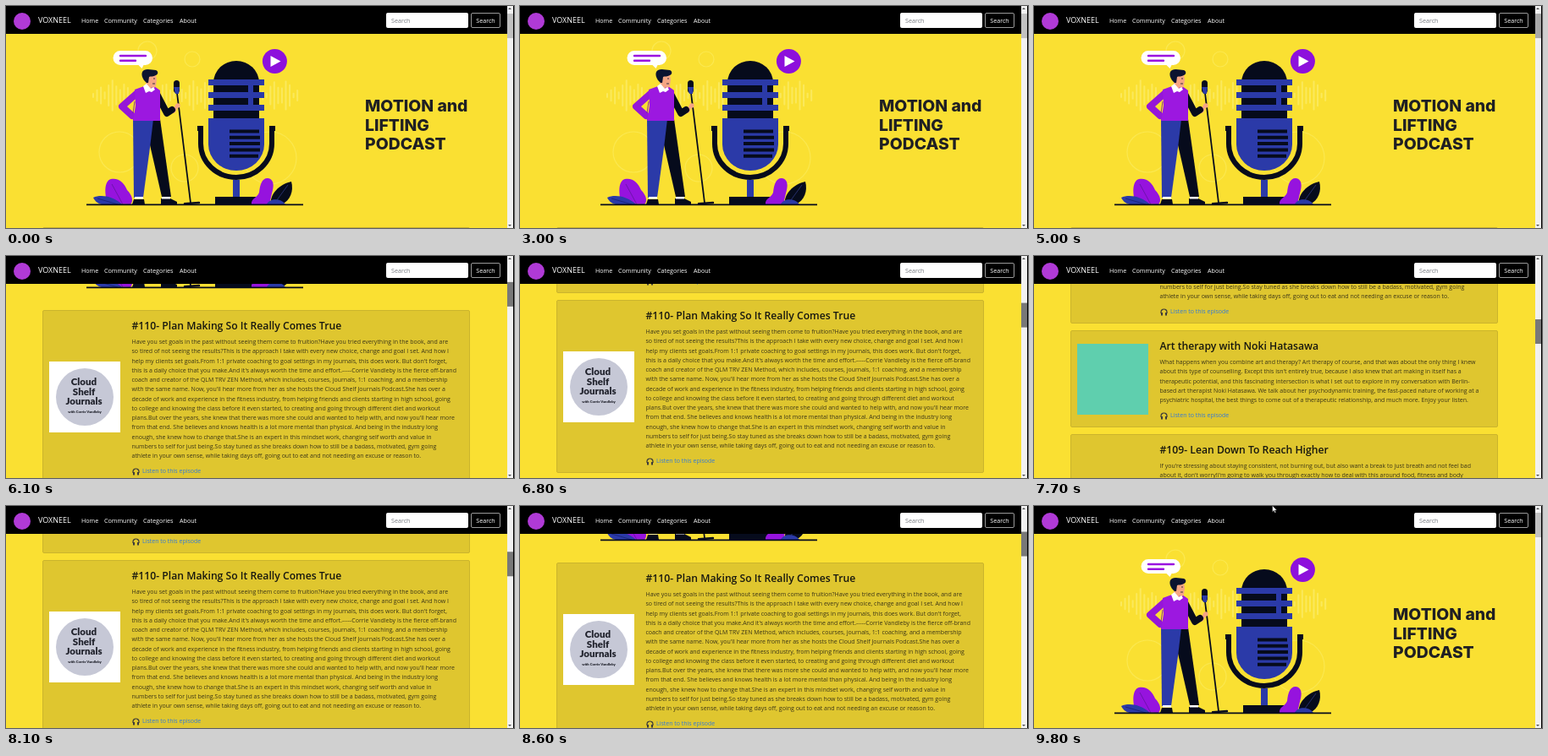
Recreate the animation shown at these times as an HTML page. Size 600 px wide and 263 px high, loop 10 s.

```html
<!DOCTYPE html>
<html lang="en">
<head>
<meta charset="utf-8">
<title>Podcast page</title>
<style>
@property --y { syntax: '<number>'; inherits: true; initial-value: 10; }
html, body { margin: 0; width: 100%; height: 100%; overflow: hidden; }
#stage {
  position: relative; width: 600px; height: 263px; overflow: hidden;
  background: #fae032; color: #212529;
  font: 7px/11.25px "Open Sans", "Noto Sans", sans-serif;
  animation: scroll 10s steps(1) infinite;
}
#stage * { box-sizing: border-box; }
#page { position: absolute; inset: 0; transform: translateY(calc(var(--y) * -1px)); }
#page > svg { position: absolute; left: 0; top: 10px; overflow: visible; }
h1 {
  position: absolute; left: 424px; top: 117px; margin: 0; white-space: pre;
  font: 800 19.4px/22.5px Inter, "Open Sans", sans-serif; color: #1f1f23;
}

.card {
  position: absolute; left: 43px; width: 505px; border-radius: 2px;
  background: #dfc62f; border: 1px solid #cbb42c;
}
.card > * { position: absolute; margin: 0; white-space: pre; }
.card h2 { left: 104.5px; top: 9px; font-size: 12.2px; line-height: 18px; font-weight: 600; color: #17170f; }
.card p { left: 104.5px; top: 31px; color: #3b3517; }
.card a { left: 117px; bottom: 7.5px; color: #3279d8; }
.card .ear { left: 105px; bottom: 8.5px; }
.cover { left: 7px; top: calc(50% - 42px); width: 84px; height: 84px; background: #fff; }
.cover.teal { background: #5fcfae; }
.cover svg { display: block; }

nav { position: absolute; left: 0; top: 0; width: 592px; height: 33px; background: #000; color: #fff; }
nav > * { position: absolute; top: 8px; height: 18px; line-height: 18px; font-size: 7.15px; }
nav i { left: 9px; width: 20px; height: 20px; border-radius: 50%; background: #b03ad6; }
nav b { left: 38px; font-size: 9px; font-weight: 400; }
.field { left: 449px; width: 97px; padding-left: 6px; border-radius: 2px; background: #fff; color: #777b80; }
.btn { left: 549px; width: 35px; border: 1px solid #999; border-radius: 2px; line-height: 16px; text-align: center; }

#bar {
  position: absolute; left: 592px; top: 0; width: 8px; height: 263px;
  background: #f1f1f1; border-right: 1px solid #000;
}
#bar::before, #bar::after {
  content: ""; position: absolute; left: 1px; border: 2.5px solid transparent;
}
#bar::before { top: 0; border-bottom-color: #505050; }
#bar::after { bottom: 0; border-top-color: #505050; }
#thumb {
  position: absolute; left: 0; top: 8px; width: 7px; height: 29px;
  transform: translateY(calc(var(--y) * 1px / 9.1));
  animation: grab 10s steps(1) infinite;
}
#cursor { position: absolute; left: 281px; top: -1px; visibility: hidden; animation: show 10s steps(1) infinite; }

/* The page moves in ticks of 100 ms */
@keyframes scroll {
  0% { --y: 10; }
  54% { --y: 10; animation-timing-function: steps(7); }
  61% { --y: 208; animation-timing-function: steps(2); }
  63% { --y: 262; }
  65% { --y: 262; animation-timing-function: steps(7); }
  72% { --y: 661; animation-timing-function: steps(2); }
  74% { --y: 740; }
  75% { --y: 740; animation-timing-function: steps(4); }
  79% { --y: 480; }
  81% { --y: 421; animation-timing-function: steps(5); }
  86% { --y: 205; }
  88% { --y: 200; }
  90% { --y: 140; }
  92% { --y: 70; animation-timing-function: steps(2); }
  94% { --y: 6; }
  95% { --y: 6; animation-timing-function: steps(3); }
  98%, 100% { --y: 0; }
}
@keyframes grab {
  0%, 94% { background: #c1c1c1; }
  50% { background: #a8a8a8; }
  55% { background: #787878; }
}
@keyframes show {
  0% { visibility: hidden; }
  96%, 100% { visibility: visible; }
}
</style>
</head>
<body>
<div id="stage">
  <div id="page">
    <svg width="600" height="263" fill="none">
      <g stroke="#fbe850" stroke-width="1.2">
        <circle cx="134" cy="173" r="24"/>
        <circle cx="167" cy="53" r="11"/>
        <circle cx="220" cy="63" r="9"/>
        <circle cx="211" cy="192" r="16"/>
        <circle cx="312" cy="180" r="31"/>
      </g>
      <path id="wave" stroke="#fbe95c" stroke-width="2" stroke-linecap="round"/>

      <!-- speech bubble and play button -->
      <path fill="#fff" d="M135 53h29.500a8.500 8.500 0 0 1 0 17h-2l-2 4-4-4H135a8.500 8.500 0 0 1 0-17z"/>
      <path stroke="#9a12e0" stroke-width="2.400" stroke-linecap="round" d="M135 59h30M135 64.700h18"/>
      <circle cx="317.400" cy="65.500" r="14.500" fill="#8d10dc"/>
      <path fill="#fff" d="M312.500 59v13l12-6.500z"/>

      <!-- large microphone -->
      <path fill="#060b1c" d="M245 134V91a27 26 0 0 1 54 0v43z"/>
      <path fill="#2b3aa8" d="M239 133h66v31a33 31 0 0 1-66 0z"/>
      <path stroke="#2b3aa8" stroke-width="7" d="M239 90.500h66M239 105.500h66M239 120.500h66"/>
      <path stroke="#2b3aa8" stroke-width="6" d="M289 90v28"/>
      <path stroke="#060b1c" stroke-width="4"
        d="M264 148.500h35M264 155.800h36M264 163.100h36M264 170.400h36M264 177.700h34"/>
      <path stroke="#060b1c" stroke-width="6" d="M226 145h7M311 145h7M230 142v21a42 40 0 0 0 84 0v-21"/>
      <path fill="#2b3aa8" d="M268 206h8v20h-8z"/>
      <path fill="#060b1c" d="M247 226h52v9h-52z"/>

      <!-- leaves -->
      <path fill="#9613de" d="M120 234c-4-12-4-27 4-29 9-2 16 5 19 13 6 6 8 13 4 17z"/>
      <path fill="#2b3aa8" d="M103 227c9-4 23-2 34 8h-24c-5-1-8-4-10-8z"/>
      <path stroke="#5b1596" stroke-width=".7" d="M125 211l13 24"/>
      <path stroke="#151f6a" stroke-width=".7" d="M108 228l24 7"/>
      <path fill="#9613de" d="M290 235c-1-7 7-8 9-14 1-9 3-17 10-17 9 1 7 12 5 18l-3 13z"/>
      <path fill="#060b1c" d="M313 235c-2-12 10-24 24-27 3 11-1 22-11 27z"/>
      <path fill="#2b3aa8" d="M308 235c3-7 16-8 22 0z"/>
      <path stroke="#35408c" stroke-width=".7" d="M333 212l-16 22"/>

      <!-- speaker -->
      <path fill="#060b1c" d="M163 134h19l13 92h-11z"/>
      <path fill="#2b3aa8" d="M150 134h24l-4 34-8 59h-11z"/>
      <path fill="#060b1c" d="M149 235l2-6h12l1 6zM183 228h11l8 4v3h-19z"/>
      <path fill="#fff" d="M152 226h10v2.500h-10zM184 226h10v2.500h-10z"/>
      <path stroke="#f5a583" stroke-width="4" stroke-linecap="round" d="M151 132l4 1M198 125l4-7"/>
      <path stroke="#060b1c" stroke-width="8" stroke-linejoin="round" stroke-linecap="round" d="M178 104l12 23 6-4"/>
      <path stroke="#9516d8" stroke-width="8" stroke-linejoin="round" stroke-linecap="round" d="M155 103l-18 16 12 11"/>
      <path fill="#9c18e0" d="M152 99l11-4h12l7 5v36h-32l3-18z"/>
      <path stroke="#6d10a5" stroke-width=".8" d="M152 113l-2 14"/>
      <path fill="#f5a583" d="M166 81h11l1 6-1 8c-2 3-4 2-5 1l-1 4-6-3z"/>
      <path fill="#fff" d="M162 95l4-3 5 6 3-2 2 3-4 3-3-1-4 2z"/>
      <path fill="#0b1430" d="M166 91c-5-4-8-12-3-15 4-2 10 0 14 0 3 1 3 5 0 6-3 2-6 1-8 2l-1 7z"/>
      <path stroke="#0b1430" stroke-width=".8" d="M174 86h2M173 92h3"/>

      <!-- stand -->
      <path stroke="#060b1c" stroke-width="1.800" d="M202 103l16 130"/>
      <path stroke="#060b1c" stroke-width="2.400" stroke-linecap="round" d="M211 234.300l17-1.300"/>
      <rect x="198" y="88" width="7" height="15" rx="3.500" fill="#060b1c"/>
      <path fill="#2b3aa8" d="M198.200 96h6.800l-1 8h-4z"/>
      <circle cx="203" cy="118" r="2.700" fill="#f5a583"/>
      <path stroke="#060b1c" stroke-width="1.700" d="M95 235.300h256"/>
    </svg>
    <h1>MOTION and
LIFTING
PODCAST</h1>
  </div>

  <nav>
    <i></i><b>VOXNEEL</b>
    <span style="left:89px">Home</span>
    <span style="left:116px">Community</span>
    <span style="left:162px">Categories</span>
    <span style="left:205px">About</span>
    <span class="field">Search</span>
    <span class="btn">Search</span>
  </nav>
  <div id="bar"><div id="thumb"></div></div>
  <svg id="cursor" width="8" height="11">
    <path fill="#fff" stroke="#222" stroke-width=".6" d="M.500.500v7.500l1.800-1.600 1.200 2.800 1.300-.6-1.200-2.600h2.400z"/>
  </svg>
</div>

<script>
const goals = `Have you set goals in the past without seeing them come to fruition?Have you tried everything in the book, and are
so tired of not seeing the results?This is the approach I take with every new choice, change and goal I set. And how I
help my clients set goals.From 1:1 private coaching to goal settings in my journals, this does work. But don't forget,
this is a daily choice that you make.And it's always worth the time and effort.-----Corrie Vandleby is the fierce off-brand
coach and creator of the QLM TRV ZEN Method, which includes, courses, journals, 1:1 coaching, and a membership
with the same name. Now, you'll hear more from her as she hosts the Cloud Shelf Journals Podcast.She has over a
decade of work and experience in the fitness industry, from helping friends and clients starting in high school, going
to college and knowing the class before it even started, to creating and going through different diet and workout
plans.But over the years, she knew that there was more she could and wanted to help with, and now you'll hear more
from that end. She believes and knows health is a lot more mental than physical. And being in the industry long
enough, she knew how to change that.She is an expert in this mindset work, changing self worth and value in
numbers to self for just being.So stay tuned as she breaks down how to still be a badass, motivated, gym going
athlete in your own sense, while taking days off, going out to eat and not needing an excuse or reason to.`.split('\n');

const art = `What happens when you combine art and therapy? Art therapy of course, and that was about the only thing I knew
about this type of counselling. Except this isn't entirely true, because I also knew that art making in itself has a
therapeutic potential, and this fascinating intersection is what I set out to explore in my conversation with Berlin-
based art therapist Noki Hatasawa. We talk about her psychodynamic training, the fast-paced nature of working at a
psychiatric hospital, the best things to come out of a therapeutic relationship, and much more. Enjoy your listen.`.split('\n');

const rest = `If you're stressing about staying consistent, not burning out, but also want a break to just breath and not feel bad
about it, don't worry!I'm going to walk you through exactly how to deal with this around food, fitness and body
image, without the identity crisis.And if you want more structure on exactly how to go about it, stay tuned till the end
for some ways I can support your through it. Both free and paid!-----Corrie Vandleby is the fierce off-brand coach and
creator of the QLM TRV ZEN Method, which includes, courses, journals, 1:1 coaching, and a membership with the
same name. Now, you'll hear more from her as she hosts the Cloud Shelf Journals Podcast.She has over a decade of`
  .split('\n').concat(goals[6].replace('decade of ', ''), goals.slice(7));

const journal = `<div class="cover"><svg width="84" height="84" text-anchor="middle"
  font-family="Lato, sans-serif" font-weight="900" font-size="11.5" fill="#20222c">
  <circle cx="42" cy="42" r="34" fill="#c6c8d6"/>
  <text x="41" y="28">Cloud</text><text x="41" y="39.500">Shelf</text><text x="41" y="51">Journals</text>
  <text x="42" y="61" font-size="4.2">with Corrie Vandleby</text></svg></div>`;
const teal = '<div class="cover teal"></div>';
const ear = `<svg class="ear" width="9" height="9" fill="none" stroke="#3c3a3a">
  <path stroke-width="1.200" d="M1 6V4.500a3.500 3.500 0 0 1 7 0V6"/><path stroke-width="2" d="M2 5v3.500M7 5v3.500"/></svg>`;

const page = document.getElementById('page');
let cardTop = 272;
function addCard(title, lines, cover) {
  const height = 58.75 + lines.length * 11.25;
  page.insertAdjacentHTML('beforeend', `<div class="card" style="top:${cardTop}px;height:${height}px">
    ${cover}<h2>${title}</h2><p>${lines.join('\n')}</p>${ear}<a>Listen to this episode</a></div>`);
  cardTop += Math.round(height + 8);
}
const plan = '#110- Plan Making So It Really Comes True';
addCard(plan, goals, journal);
addCard(plan, goals, journal);
addCard('Art therapy with Noki Hatasawa', art, teal);
addCard('#109- Lean Down To Reach Higher', rest, journal);

// Sound bars across the hero
let bars = '';
for (let i = 0; i < 54; i++) {
  const h = 2 + 16 * Math.abs(Math.sin(i * 0.9 + 0.3) * Math.sin(i * 0.29));
  bars += `M${103 + i * 4.55} ${106 - h}v${2 * h}`;
}
document.getElementById('wave').setAttribute('d', bars);
</script>
</body>
</html>
```
